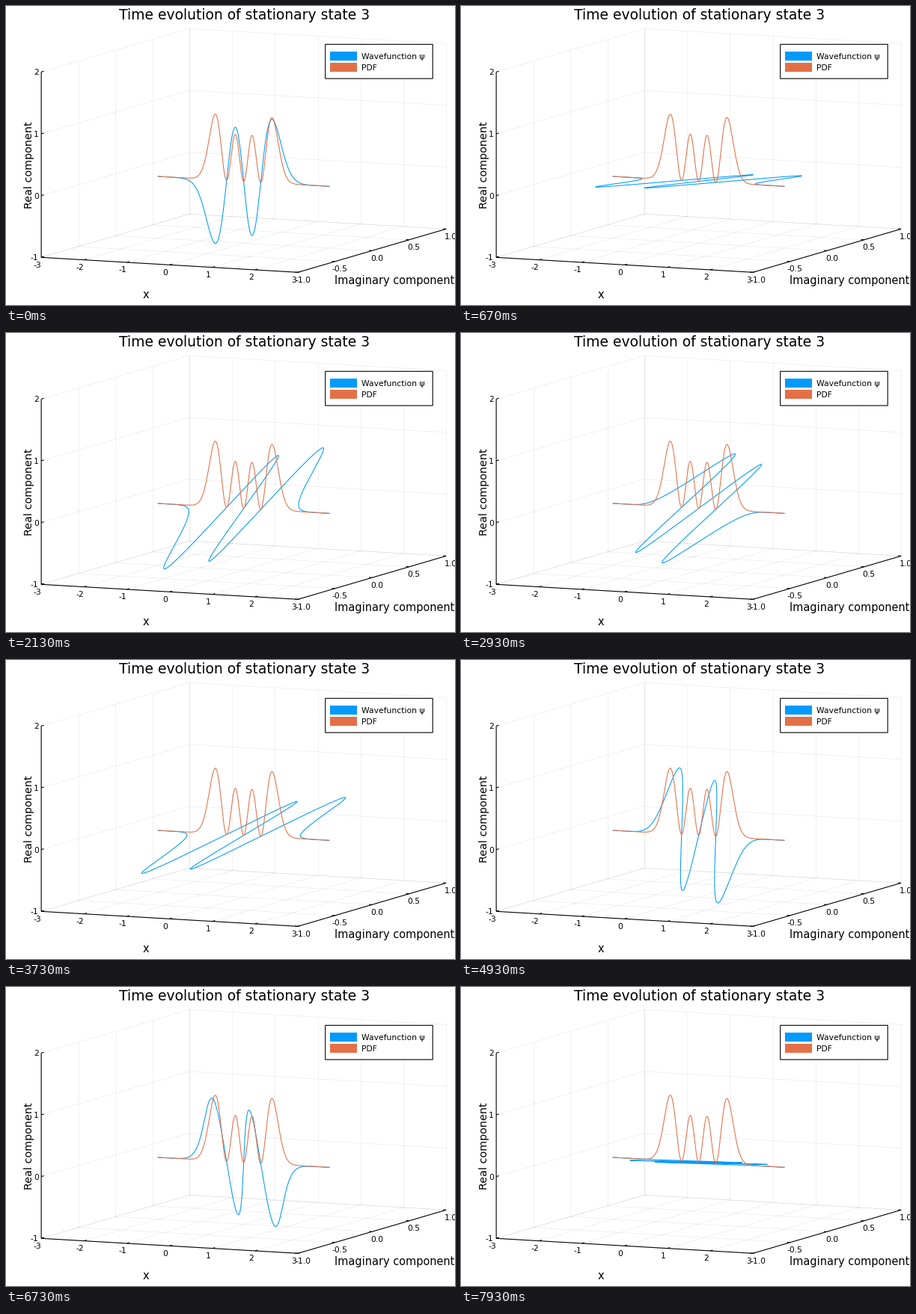
A matplotlib script for the animation above (8000 ms loop, 600 px wide and 400 px high).

```python
import math

import numpy as np
import matplotlib.pyplot as plt
from matplotlib.animation import FuncAnimation
from matplotlib.patches import Rectangle

W, H, DPI = 600, 400, 100
TICK_MS = 20
LOOP_MS = 8000
PT = 72 / DPI  # points per pixel

BLUE, ORANGE = "#009AFA", "#E36F47"

plt.rcParams["font.family"] = "DejaVu Sans"

fig = plt.figure(figsize=(W / DPI, H / DPI), dpi=DPI, facecolor="white")
ax = fig.add_axes([0, 0, 1, 1])
ax.set_xlim(0, W)
ax.set_ylim(H, 0)
ax.axis("off")


def project(x, im, re):
    """Orthographic view of (x, imaginary, real) in stage pixels."""
    px = 47.1 + (x + 3) * 343 / 6 + (im + 1) * 99
    py = 336.3 + (x + 3) * 20 / 6 - (im + 1) * 29 - (re + 1) * 248 / 3
    return px, py


def segment(p, q, **style):
    (x0, y0), (x1, y1) = project(*p), project(*q)
    ax.plot([x0, x1], [y0, y1], **style)


def label(x, y, text, size, ha="center", **kw):
    ax.text(x, y, text, fontsize=size * PT, color="black",
            ha=ha, va="baseline", **kw)


def draw_grid():
    style = dict(color="black", alpha=0.1, lw=0.55 * PT, zorder=1)
    for x in range(-3, 4):
        segment((x, -1, -1), (x, 1, -1), **style)
        segment((x, 1, -1), (x, 1, 2), **style)
    for im in np.linspace(-1, 1, 5):
        segment((-3, im, -1), (3, im, -1), **style)
        segment((-3, im, -1), (-3, im, 2), **style)
    for re in range(-1, 3):
        segment((-3, -1, re), (-3, 1, re), **style)
        segment((-3, 1, re), (3, 1, re), **style)


def draw_axes():
    style = dict(color="black", lw=1.1 * PT, zorder=2, snap=False,
                 solid_capstyle="butt")
    segment((-3, -1, -1), (-3, -1, 2), **style)
    segment((-3, -1, -1), (3, -1, -1), **style)
    segment((3, -1, -1), (3, 1, -1), **style)

    size = 10.77
    for x in range(-3, 4):
        segment((x, -1, -1), (x, -0.965, -1), **style)
        px, py = project(x, -1, -1)
        label(px - 5.7, py + 13.2, str(x), size)
    for im in np.linspace(-1, 1, 5):
        segment((3, im, -1), (2.93, im, -1), **style)
        px, py = project(3, im, -1)
        label(px + 6.4, py + 13.4, f"{im:.1f}", size)
    for re in range(-1, 3):
        segment((-3, -1, re), (-3, -0.965, re), **style)
        px, py = project(-3, -1, re)
        label(43.7, py + 4, str(re), size, ha="right")

    label(318.5, 18, "Time evolution of stationary state 3", 18.78)
    label(187.2, 391, "x", 14.6)
    label(438.8, 372, "Imaginary component", 14.5, ha="left")
    label(35, 212.7, "Real component", 14.45, rotation=90,
          rotation_mode="anchor")


def draw_legend():
    ax.add_patch(Rectangle((426.7, 51.3), 143.5, 45.8, facecolor="white",
                           edgecolor="black", lw=1.1 * PT, zorder=6,
                           snap=False))
    rows = [(61, BLUE, "Wavefunction ψ"), (76, ORANGE, "PDF")]
    for top, color, name in rows:
        ax.add_patch(Rectangle((433, top), 36, 12, facecolor=color,
                               edgecolor="none", zorder=7))
        label(474.7, top + 10.3, name, 10.7, ha="left", zorder=7)


draw_grid()
draw_axes()
draw_legend()

# Third excited state of the harmonic oscillator
SCALE = 3.07
PHASE_STEP = 7 / 3
xs = np.linspace(-2, 2, 401)
xi = SCALE * xs
psi = (math.sqrt(SCALE / (3 * math.sqrt(math.pi)))
       * (2 * xi**3 - 3 * xi) * np.exp(-xi**2 / 2))

wave, = ax.plot([], [], color=BLUE, lw=1.05 * PT, zorder=4)
ax.plot(*project(xs, 0, psi**2), color=ORANGE, lw=1.05 * PT, zorder=5)


def update(i):
    # 15 steps per second, held for 60 or 80 ms on the 20 ms clock
    step = (3 * i + 2) // 10
    state = psi * np.exp(-1j * PHASE_STEP * step)
    wave.set_data(*project(xs, state.imag, state.real))
    return wave,


anim = FuncAnimation(fig, update, frames=LOOP_MS // TICK_MS,
                     interval=TICK_MS, repeat=True, repeat_delay=0,
                     blit=False)
plt.show()
```
